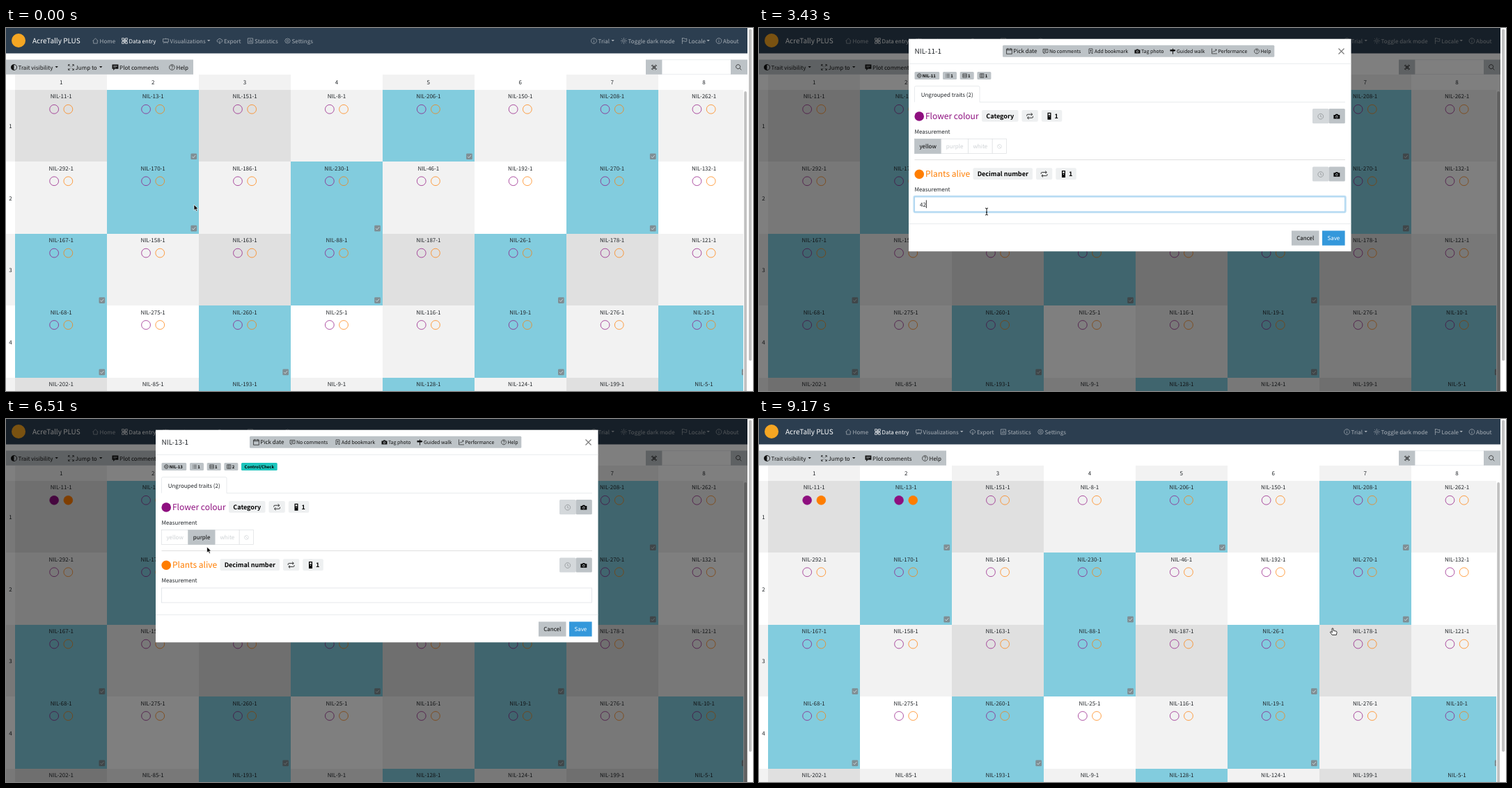
Recreate the animation shown at these times as an HTML page. Size 1073 by 522 pixels, loop 9.24 s.

```html
<!DOCTYPE html>
<html lang="en">
<head>
<meta charset="utf-8">
<title>Field scoring</title>
<style>
  html, body { margin: 0; width: 100%; height: 100%; overflow: hidden; background: #fff; }
  svg { display: block; }
  text {
    font: 8px "Noto Sans CJK SC", "Noto Sans CJK JP", "Noto Sans CJK", sans-serif;
    fill: currentColor; text-rendering: geometricPrecision; white-space: pre;
  }
  .mid { text-anchor: middle; }
  .tiny { font-size: 6px; }
  .small { font-size: 7px; }
  .badge { font-size: 9px; }
  .title { font-size: 10px; }
  .heading { font-size: 12px; }
  .bold { font-weight: 700; }
  .icon { fill: none; stroke: currentColor; stroke-width: 1.25; }
  .solid { fill: currentColor; stroke: none; fill-rule: evenodd; }
</style>
</head>
<body>
<svg id="stage" width="100%" height="100%" viewBox="0 0 1073 522"></svg>
<script>
const LOOP = 9240, STEP = 70;
const SILVER = '#bdc3c7', PALE = '#eef0f1', LINE = '#dee2e6', INK = '#212529', THUMB = '#c1c1c1';
const PURPLE = '#8e0f7f', ORANGE = '#ff7d00', BLUE = '#3498db';
const PREFIX = 'NIL';

const ring = 'M8 1a7 7 0 1 0 .01 0z';
const box = 'M1.5 1.5h13v13h-13z';
const icons = {
  home: 'M1 8.5L8 1.5l7 7M3 7v7.5h10V7',
  tiles: 'M1 1h5v5H1zM10 1h5v5h-5zM1 10h5v5H1zM10 10h5v5h-5zM8 2v6H2M14 8H8v6',
  easel: 'M1 3h14v8H1zM8 1v2M5 11l-2 4M11 11l2 4M8 11v3',
  cloud: 'M5 11H4a3 3 0 0 1 0-6a4.2 4.2 0 0 1 8 0a3 3 0 0 1 0 6h-1M8 7v8M5.5 12.5L8 15l2.5-2.5',
  chart: box + 'M5 12V8M8 12V4M11 12V6',
  gear: 'M8 1.5l2 1.5h2.5l1 2.5L15 8l-1.5 2.5-1 2.5H10l-2 1.5L6 13H3.5l-1-2.5L1 8l1.5-2.5 1-2.5H6zM8 5.5a2.5 2.5 0 1 0 .01 0z',
  info: ring + 'M8 7v5M8 4v1.5',
  sun: 'M8 5a3 3 0 1 0 .01 0zM8 0v3M8 13v3M0 8h3M13 8h3M2.3 2.3l2 2M11.7 11.7l2 2M2.3 13.7l2-2M11.7 4.3l2-2',
  flag: 'M2.5 0v16M2.5 2q3-2 6 0t5.5 0v7q-3 1.5-5.5 0t-6 0',
  half: 'M8 0a8 8 0 1 0 .01 0zM8 1.5a6.5 6.5 0 0 1 0 13z',
  expand: 'M6 6L1.5 1.5M1 5V1h4M10 6l4.5-4.5M11 1h4v4M6 10l-4.5 4.5M1 11v4h4M10 10l4.5 4.5M15 11v4h-4',
  comment: 'M0 1h16v11H7l-4 4v-4H0zM3 3.5v1h10v-1zM3 6v1h10V6zM3 8.5v1h7v-1z',
  help: ring + 'M5.7 6a2.3 2.3 0 1 1 3.3 2.1q-1 .5-1 1.7M8 11v1.3',
  target: 'M2 2l12 12M14 2L2 14M5 1L1 5M11 1l4 4M5 15l-4-4M11 15l4-4M5 5h6v6H5z',
  search: 'M6.5 1a5.5 5.5 0 1 0 .01 0zM10.5 10.5L15 15',
  calendar: 'M1 2h14v13H1zM1 5h14M4 0v3M12 0v3',
  bubble: 'M1 2h14v10H7l-3 3v-3H1zM4 5.5h8M4 8.5h6',
  bookmark: 'M3 1h10v14l-5-4-5 4zM8 4v5M5.5 6.5h5',
  camera: 'M0 4h4l1.5-2h5L12 4h4v10H0zM8 5.5a3.3 3.3 0 1 0 .01 0zM8 7a1.8 1.8 0 1 1-.01 0z',
  sign: 'M0 3h13l3 2.5L13 8H0zM7 0h2v3H7zM7 8h2v8H7z',
  trend: 'M1 0v15h15M3 11l4-4 2 2 5-6M10.5 3H14v3.5',
  seed: ring + 'M8 4a4 4 0 1 0 .01 0zM8 7v2',
  list: 'M5 3h10M5 8h10M5 13h10M1 3h2M1 8h2M1 13h2',
  rows: box + 'M1.5 6h13M1.5 10h13',
  columns: box + 'M6 1.5v13M10 1.5v13',
  repeat: 'M1 8V6q0-2 2-2h10M10.5 1L14 4l-3.5 3M15 8v2q0 2-2 2H3M5.5 9L2 12l3.5 3',
  device: 'M4 0h8v16H4zM6 2v4h4V2zM7 8v1.5h2V8z',
  clock: ring + 'M8 4v4.5l3 1.5',
  ban: 'M8 2.5a5.5 5.5 0 1 0 .01 0zM4 4l8 8'
};
const solid = ['half', 'comment', 'camera', 'sign', 'device'];

const text = (x, y, s, cls = '') => `<text x="${x}" y="${y}" class="${cls}">${s}</text>`;
const rect = (x, y, w, h, fill, more = '') =>
  `<rect x="${x}" y="${y}" width="${w}" height="${h}" fill="${fill}" ${more}/>`;
const line = (x1, y1, x2, y2, color = LINE, w = .7) =>
  `<path d="M${x1} ${y1}L${x2} ${y2}" stroke="${color}" stroke-width="${w}"/>`;
const group = (color, ...parts) => `<g color="${color}">${parts.join('')}</g>`;
const caret = (x, y) => `<path d="M${x} ${y - 1}h4.4l-2.2 2.3z" fill="currentColor"/>`;
// Icons are placed by left edge and vertical centre.
const icon = (name, x, y, size = 8.9) =>
  `<path class="${solid.includes(name) ? 'solid' : 'icon'}" d="${icons[name]}"
    transform="translate(${x} ${y - size / 2}) scale(${size / 16})"/>`;
const item = (name, x, y, label, cls, gap = 10.6) =>
  icon(name, x, y, cls ? 8 : 8.9) + text(x + gap, y + (cls ? 2.7 : 3), label, cls);
const dot = (x, y, color, id = '') =>
  `<circle ${id} cx="${x}" cy="${y}" r="6.4" fill="${color}" fill-opacity="0" stroke="${color}" stroke-width=".72"/>`;

function navbar() {
  return rect(0, 0, 1065, 36.5, '#2c3e50')
    + '<circle cx="18" cy="18" r="10" fill="#f5a623"/>'
    + group('#fff', text(38, 22, 'AcreTally PLUS', 'title'), item('tiles', 166, 18.5, 'Data entry'))
    + group('rgba(255,255,255,.6)',
      item('home', 124, 18.5, 'Home'), item('easel', 225, 18.5, 'Visualizations'), caret(289, 18),
      item('cloud', 302.5, 18.5, 'Export'), item('chart', 346.5, 18.5, 'Statistics'),
      item('gear', 400, 18.5, 'Settings'), item('info', 840, 18.5, 'Trial'), caret(869.5, 18),
      item('sun', 883, 18.5, 'Toggle dark mode'), item('flag', 970, 18.5, 'Locale'), caret(1006.5, 18),
      item('info', 1019.5, 18.5, 'About'));
}

function toolbar() {
  return rect(0, 45.5, 269, 21.3, SILVER) + rect(919, 45.5, 23.5, 21.3, SILVER)
    + rect(942.5, 45.8, 99, 20.6, '#fff', `stroke="${LINE}" stroke-width=".6"`)
    + rect(1041, 45.5, 24, 21.3, SILVER)
    + group('#111',
      item('half', 7, 56.5, 'Trait visibility'), caret(70.5, 56),
      item('expand', 89, 56.5, 'Jump to'), caret(134, 56),
      item('comment', 152.5, 56.5, 'Plot comments'), item('help', 234, 56.5, 'Help'),
      icon('target', 926.5, 56.5), icon('search', 1048, 56.5));
}

const plots = [
  [11, 13, 151, 8, 206, 150, 208, 262],
  [292, 170, 186, 230, 46, 192, 270, 132],
  [167, 158, 163, 88, 187, 26, 178, 121],
  [68, 275, 260, 25, 116, 19, 276, 10],
  [202, 85, 193, 9, 128, 124, 199, 5]
];
const checks = ['257', '247', '146', '1368', '358'];

function grid() {
  const x0 = 13.3, y0 = 89, w = 131.9, h = 103.4;
  const shade = odds => ['#fff', '#f2f2f2', '#e0e0e0'][odds];
  const cell = (x, y, cw, ch, fill) => rect(x, y, cw, ch, fill, 'shape-rendering="crispEdges"');
  let out = '';
  plots.forEach((row, r) => {
    const y = y0 + r * h, oddRow = 1 - r % 2;
    out += cell(0, y, x0, h, shade(oddRow)) + text(6.6, y + 55.3, r + 1, 'mid');
    row.forEach((plot, c) => {
      const x = x0 + c * w, mid = x + w / 2, oddCol = 1 - c % 2;
      const isCheck = checks[r].includes(c + 1);
      if (!r) out += cell(x, 67, w, 22, shade(oddCol)) + text(mid, 81, c + 1, 'mid');
      out += cell(x, y, w, h, isCheck ? '#82ccde' : shade(oddRow + oddCol))
        + text(mid, y + 12.3, `${PREFIX}-${plot}-1`, 'mid')
        + dot(mid - 10.1, y + 27.8, PURPLE, `data-plot="${plot}"`)
        + dot(mid + 10.1, y + 27.8, ORANGE, `data-plot="${plot}"`);
      if (isCheck) {
        const cx = x + w - 11.7, cy = y + 91.4;
        out += rect(cx, cy, 8.7, 8.7, '#7f8e94', 'rx="1.3"')
          + `<path d="M${cx + 2} ${cy + 4.4}l1.7 1.8 3.2-3.7" fill="none" stroke="#c9d6da"/>`;
      }
    });
  });
  return `<g clip-path="url(#gridClip)">${out}</g>` + rect(1060.2, 91, 3.8, 440, THUMB, 'rx="1.9"');
}

function traitRow(y, color, name, x, type, typeW) {
  const next = x + typeW + 5;
  const tag = (tx, w) => rect(tx, y - 8.8, w, 16.8, PALE, 'rx="2"');
  return `<circle cx="230.2" cy="${y + .3}" r="6.8" fill="${color}"/>`
    + group(color, text(239, y + 4, name, 'heading'))
    + tag(x, typeW) + tag(next, 23.3) + tag(next + 28.3, 29.5)
    + group('#000',
      text(x + typeW / 2, y + 3, type, 'badge bold mid'),
      icon('repeat', next + 6.6, y, 10), icon('device', next + 34.5, y, 10),
      text(next + 47, y + 3, '1', 'badge bold'))
    + rect(795, y - 10.6, 23.5, 21.2, '#d4d8db', 'rx="1.5"')
    + rect(818.5, y - 10.6, 23.3, 21.2, SILVER, 'rx="1.5"')
    + group('#85898c', icon('clock', 802.3, y + .5)) + group('#000', icon('camera', 825.4, y + .5))
    + text(223.5, y + 24.8, 'Measurement');
}

const options = [['yellow', 223.5, 38.3], ['purple', 261.8, 38.7], ['white', 300.5, 34.7], ['', 335.2, 20.3]];

function modal() {
  const tag = (x, w, name, id, label) => rect(x, 63, w, 11, SILVER, 'rx="1.5"')
    + icon(name, x + 3.5, 68.5, 6.7) + `<text ${id} x="${x + 11.3}" y="70.8" class="tiny bold">${label}</text>`;
  return rect(215, 15.7, 635.5, 305.5, '#fff')
    + '<text id="plotTitle" x="223.5" y="37.3" class="title"></text>'
    + rect(350, 24.8, 390.3, 17, SILVER, 'rx="1.5"')
    + group('#111',
      icon('calendar', 355, 33.4), text(365.2, 36.4, 'Pick date'),
      item('bubble', 407.5, 33.4, 'No comments', 'small', 9.4),
      item('bookmark', 472.5, 33.4, 'Add bookmark', 'small', 9.4),
      item('camera', 539.5, 33.4, 'Tag photo', 'small', 9.4),
      item('sign', 590.5, 33.4, 'Guided walk', 'small', 9.4),
      item('trend', 650, 33.4, 'Performance', 'small', 9.4),
      item('help', 711, 33.4, 'Help', 'small', 9.4))
    + line(832.5, 29.5, 840.5, 37.5, '#777', 1.1) + line(840.5, 29.5, 832.5, 37.5, '#777', 1.1)
    + line(215, 51.3, 850.5, 51.3)
    + group('#000',
      tag(223.5, 35.7, 'seed', 'id="plotTag"', ''), tag(264, 20, 'list', '', 1),
      tag(288.7, 20, 'rows', '', 1), tag(313.4, 20, 'columns', 'id="columnTag"', ''),
      `<g id="checkTag">${rect(338, 63, 51.7, 11, '#1bc5bd', 'rx="1.5"')}${text(363.8, 70.8, 'Control/Check', 'tiny bold mid')}</g>`)
    + `<path d="M223.5 106.6V85.5q0-2 2-2h89.5q2 0 2 2v21.1H842" fill="none" stroke="${LINE}" stroke-width=".7"/>`
    + text(270.2, 98.6, 'Ungrouped traits (2)', 'mid')
    + traitRow(126.7, PURPLE, 'Flower colour', 320, 'Category', 52.5)
    + '<g id="options"></g>' + line(223.5, 189.5, 842, 189.5, '#d3d3d3')
    + traitRow(210, ORANGE, 'Plants alive', 307.5, 'Decimal number', 85.5)
    + rect(222.4, 241.9, 620.3, 23.2, 'none', `id="focusRing" rx="2" stroke="${BLUE}" stroke-opacity=".3" stroke-width="2.2"`)
    + rect(223.5, 243, 618.1, 21, '#fff', 'id="field" stroke-width=".8"')
    + '<text id="value" x="231" y="256.5"></text>'
    + rect(0, 247.5, .8, 11.5, '#000', 'id="textCaret"')
    + line(215, 281.6, 850.5, 281.6)
    + rect(765, 291.5, 39.5, 21.2, SILVER) + rect(809, 291.5, 32.6, 21.2, BLUE)
    + group('#000', text(784.7, 305, 'Cancel', 'mid')) + group('#fff', text(825.3, 305, 'Save', 'mid'));
}

const pointers = {
  arrow: '<path d="M0 0v8.3l2-1.8 1.3 3 1.5-.7-1.3-2.8h2.6z" fill="#000" stroke="#fff" stroke-width=".7"/>',
  hand: '<path d="M-1 .3q1-1 1.8 0l.5 3.2 4 .7q1 .6.7 2.3l-.7 3H-.7L-3.4 6q-.3-1.3 1-1.2l1.7 1.2z" fill="#fff" stroke="#000" stroke-width=".8"/>',
  beam: '<path d="M-2-5q2 0 2 1.2Q0-5 2-5M0-4v8M-2 5q2 0 2-1.2Q0 5 2 5M-1 1h2" fill="none" stroke="#000" stroke-width=".9"/>'
};

// Pointer stops: time, x, y, shape shown from then on.
const stops = [
  [0, 270, 254, 'arrow'], [280, 67.5, 124, 'arrow'], [560, 67.5, 124, 'arrow'],
  [1000, 68.5, 118.5, 'arrow'], [1120, 68.5, 118.5, 'arrow'],
  [1640, 243, 170, 'hand'], [1720, 245, 171, 'hand'], [1800, 248, 184, 'arrow'],
  [2000, 274, 253, 'beam'], [2380, 277, 258, 'beam'], [2450, 277, 258, 'beam'],
  [2590, 271, 255, 'beam'], [3220, 271, 255, 'beam'], [3430, 327, 264, 'beam'],
  [3500, 375, 267, 'arrow'], [3950, 864, 302, 'arrow'], [4180, 824, 300, 'hand'],
  [4400, 824, 300, 'hand'], [4480, 811, 286, 'hand'], [4550, 770, 268, 'arrow'],
  [5180, 226, 132, 'arrow'], [5460, 226, 132, 'arrow'], [6200, 279, 162, 'hand'],
  [6400, 283, 166, 'hand'], [6500, 288, 182, 'arrow'], [6840, 315, 256, 'beam'],
  [7280, 340, 259, 'beam'], [7490, 340, 259, 'beam'], [7560, 340, 259, 'none'],
  [7630, 348, 260, 'beam'], [7770, 420, 268, 'arrow'], [8190, 670, 290, 'arrow'],
  [8400, 670, 290, 'arrow'], [8750, 824, 301, 'hand'], [LOOP, 824, 301, 'hand']
];

const stage = document.getElementById('stage');
stage.innerHTML = '<clipPath id="gridClip"><path d="M0 67h1059v455H0z"/></clipPath>'
  + group(INK, navbar(), toolbar(), grid(),
    rect(0, 0, 1065, 522, '#000', 'id="backdrop"'), `<g id="modal">${modal()}</g>`)
  + rect(1065, 0, 8, 522, '#fff') + rect(1067, 1.5, 4.2, 477, THUMB, 'rx="2"')
  + '<g id="pointer"></g>';

const el = id => document.getElementById(id);
const set = (id, name, value) => el(id).setAttribute(name, value);
const ramp = (t, a, b) => Math.min(1, Math.max(0, (t - a) / (b - a)));

function drawOptions(chosen) {
  el('options').innerHTML = options.map(([label, x, w], i) => {
    const on = i === chosen;
    return rect(x, 159.6, w, 21, on ? SILVER : '#fff', `stroke="${on ? SILVER : '#dcdfe1'}" stroke-width=".7"`)
      + group(on ? '#000' : '#cdd1d4', label ? text(x + w / 2, 173.2, label, 'mid') : icon('ban', x + 6, 170.3, 8.4));
  }).join('');
}

// Monotone cubic through the stops: flows through waypoints, rests at pauses and turns.
const slope = (i, k) => i < 0 || i + 1 >= stops.length ? 0
  : (stops[i + 1][k] - stops[i][k]) / (stops[i + 1][0] - stops[i][0]);
function tangent(i, k) {
  const before = slope(i - 1, k), after = slope(i, k);
  return before * after > 0 ? 2 * before * after / (before + after) : 0;
}
function along(i, t, k) {
  const [a, b] = [stops[i], stops[i + 1]], d = b[0] - a[0], p = (t - a[0]) / d, q = 1 - p;
  return a[k] * q * q * (1 + 2 * p) + b[k] * p * p * (1 + 2 * q)
    + d * p * q * (q * tangent(i, k) - p * tangent(i + 1, k));
}

function drawPointer(t) {
  const i = stops.findLastIndex(s => s[0] <= t);
  set('pointer', 'transform', `translate(${along(i, t, 1)} ${along(i, t, 2)})`);
  el('pointer').innerHTML = pointers[stops[i][3]] || '';
}

const visits = [
  { plot: 11, column: 1, open: 570, pick: 1680, option: 0, focus: 2060, keys: [[3290, '4'], [3400, '42']], close: 4200 },
  { plot: 13, column: 2, open: 5330, pick: 6370, option: 1, focus: 6860, keys: [[7560, '1']], close: 8900 }
];

function render(t) {
  const v = visits[t < visits[1].open ? 0 : 1];
  const shown = ramp(t, v.open + 40, v.open + 130) - ramp(t, v.close, v.close + 110);
  const dim = ramp(t, v.open, v.open + 75) - ramp(t, v.close + 140, v.close + 270);
  set('backdrop', 'opacity', dim / 2);
  set('modal', 'opacity', shown);
  set('modal', 'transform', `translate(0 ${-28 * (1 - shown) ** 2})`);

  el('plotTitle').textContent = `${PREFIX}-${v.plot}-1`;
  el('plotTag').textContent = `${PREFIX}-${v.plot}`;
  el('columnTag').textContent = v.column;
  set('checkTag', 'opacity', v.plot === 13 ? 1 : 0);
  drawOptions(t < v.pick ? 3 : v.option);

  const typed = v.keys.findLast(key => key[0] <= t);
  const value = typed ? typed[1] : '';
  const since = t - (typed ? v.keys[0][0] : v.focus);
  set('focusRing', 'opacity', ramp(t, v.focus, v.focus + 150));
  set('field', 'stroke', t > v.focus ? '#99cbed' : LINE);
  el('value').textContent = value;
  set('textCaret', 'x', 231 + value.length * 4.44);
  set('textCaret', 'opacity', since >= 0 && since % 1060 < 530 ? 1 : 0);

  for (const { plot, close } of visits)
    stage.querySelectorAll(`[data-plot="${plot}"]`)
      .forEach(d => d.setAttribute('fill-opacity', t > close ? 1 : 0));
  drawPointer(t);
}

const start = performance.now();
let last = -1;
function tick() {
  const t = Math.floor((performance.now() - start) % LOOP / STEP) * STEP;
  if (t !== last) render(last = t);
  requestAnimationFrame(tick);
}
tick();
</script>
</body>
</html>
```
